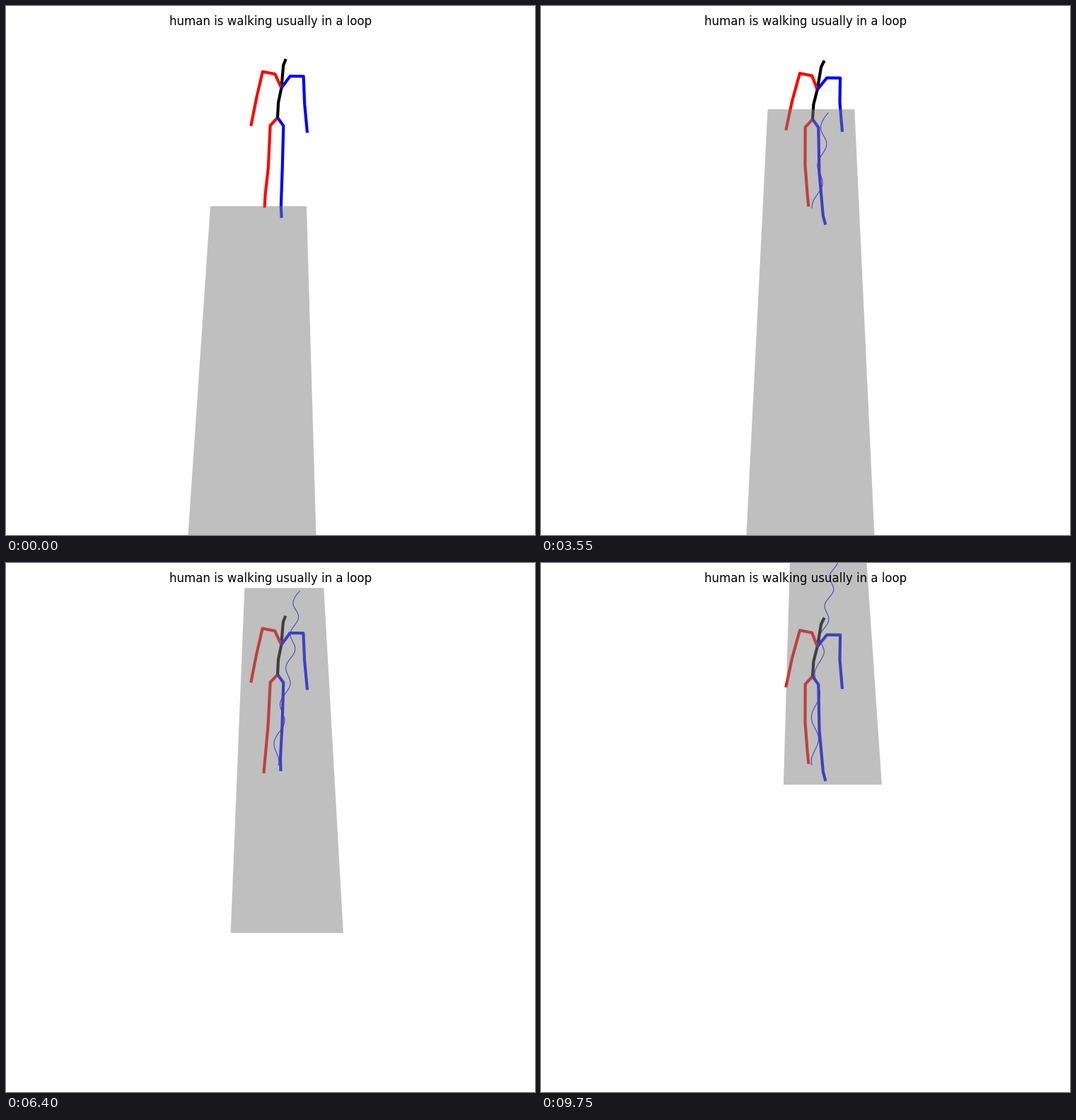
Write a matplotlib script that moves like this. It is 748 px wide and 748 px high and loops after 9.8 s.

```python
import numpy as np
import matplotlib.pyplot as plt
from matplotlib.animation import FuncAnimation
from matplotlib.patches import Polygon

SIZE, DPI = 748, 100
FRAMES, STEP = 196, 50

# Ground perspective: vanishing point and plane width per pixel below it
VX, VY, SPREAD = 384, -1122, 0.0968
LEFT, NEAR, FAR, ROOT = -0.709, 4.555, 7.117, 7.088

# Mean skeleton in pixels, each limb from the trunk outwards
SPINE = np.array([(384, 159), (385.2, 138), (390, 117), (394, 85), (398, 76)])
R_ARM = np.array([(381.7, 97.3), (364.3, 93.9), (354.7, 131.5), (346.3, 172.5)])
L_ARM = np.array([(402.9, 100.3), (421.8, 100.5), (422.3, 137), (426, 178.7)])
R_LEG = np.array([(373.7, 170), (372, 227.5), (371.2, 272), (371.5, 289)])
L_LEG = np.array([(392.3, 170.5), (392, 232.3), (393.5, 281), (395.5, 298)])
PELVIS_Y = 159

frames = np.arange(FRAMES)

# Gait cycles: whole numbers when the weight is fully on the right foot
phase = np.interp(frames, [0, 20, 47, 128, 169, 195],
                  [.5, 1, 2.09, 5.6, 7.09, 8.12])

# Steady walk after a soft start; slow drift plus a sway in each cycle
walk = 0.01325 * (frames - 13 * (1 - np.exp(-frames / 13)))
sway = (-0.23 + 0.17 * np.cos(np.pi * frames / 180)
        - 0.04 * np.cos(2 * np.pi * phase) + 0.01)


def ground(x, depth):
    p = 1e4 / np.asarray(depth)
    return np.column_stack([VX + np.asarray(x) * SPREAD * p, VY + p])


def stride(q):
    """Foot from front (1) to back (-1) on the ground, then swung forward."""
    q %= 1
    return 1 - q / 0.3 if q < 0.6 else -np.cos(np.pi * (q - 0.6) / 0.4)


def lean(points, w):
    """Bob the body, and bend it sideways more the higher it is."""
    height = np.clip(PELVIS_Y - points[:, 1], 0, None)
    return points + np.column_stack([2.8 * w * (height / 84) ** 2,
                                     np.full(len(points), 1.3 * w)])


def arm(points, w, side):
    out = lean(points, w)
    out[2:, 1] += 2 * side * w
    return out


def leg(points, w, side, start):
    out = points.copy()
    s = stride(start)
    out[:, 0] += w * np.array([0, 1.5, 5.5, 7])
    out[:, 1] += [1.3 * w, -3 * side * w, 22 * s, 16 * s]
    return out


def pose(ph):
    w = np.cos(2 * np.pi * (ph - 0.09))
    spine = lean(SPINE, w)
    pelvis, chest = spine[0], spine[2]
    return [
        np.vstack([pelvis, leg(R_LEG, w, 1, ph - 0.73)]),
        np.vstack([pelvis, leg(L_LEG, w, -1, ph - 0.23)]),
        spine,
        np.vstack([chest, arm(R_ARM, w, 1)]),
        np.vstack([chest, arm(L_ARM, w, -1)]),
    ]


fig = plt.figure(figsize=(SIZE / DPI, SIZE / DPI), dpi=DPI, facecolor="white")
ax = fig.add_axes([0, 0, 1, 1])
ax.set_xlim(0, SIZE)
ax.set_ylim(SIZE, 0)
ax.axis("off")

trail, = ax.plot([], [], color="blue", lw=0.75, solid_capstyle="butt")
limbs = [ax.plot([], [], color=color, lw=3, solid_capstyle="butt")[0]
         for color in ("red", "blue", "black", "red", "blue")]
plane = ax.add_patch(Polygon(np.zeros((4, 2)), closed=True, lw=0,
                             facecolor=(0.5, 0.5, 0.5, 0.5), zorder=5))
ax.text(374, 27.3, "human is walking usually in a loop", family="DejaVu Sans",
        fontsize=12, ha="center", va="baseline", zorder=6)


def draw(f):
    x = LEFT - sway[f]
    near, far = NEAR + walk[f], FAR + walk[f]
    plane.set_xy(ground([x, x + 1, x + 1, x], [far, far, near, near]))
    trail.set_data(*ground(sway[:f] - sway[f], ROOT + walk[f] - walk[:f]).T)
    for line, points in zip(limbs, pose(phase[f])):
        line.set_data(*points.T)
    return [trail, *limbs, plane]


anim = FuncAnimation(fig, draw, frames=FRAMES, interval=STEP, repeat=True,
                     repeat_delay=0, blit=False)
plt.show()
```
